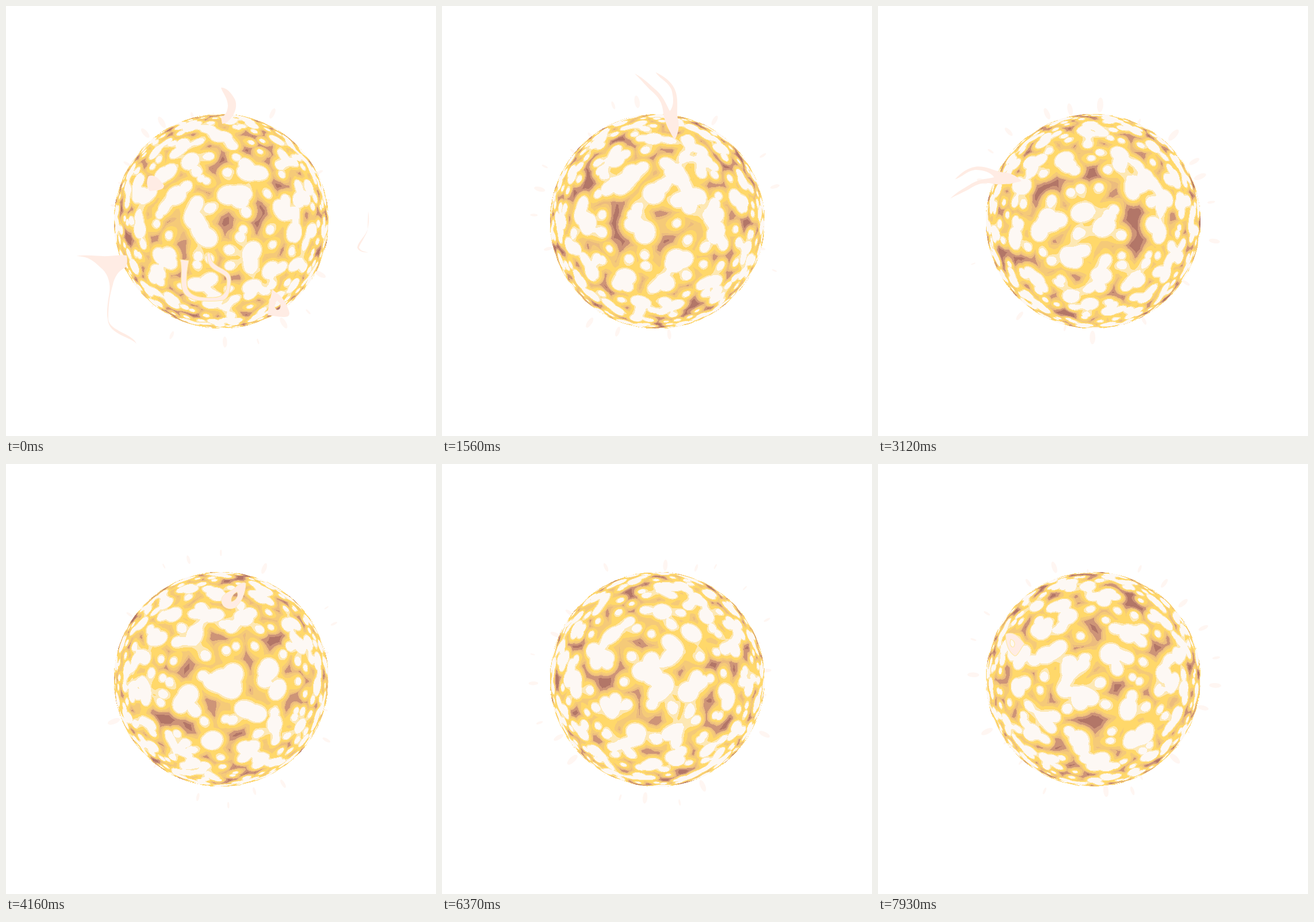
Animation, 748 px wide and 748 px high, one loop 8000 ms. Source, as an HTML page with a canvas:

```html
<!DOCTYPE html>
<html lang="en">
<head>
<meta charset="utf-8">
<title>Star</title>
<style>
  html, body { margin: 0; width: 100%; height: 100%; overflow: hidden; background: #fff; }
  canvas { display: block; width: 100vw; height: 100vh; }
</style>
</head>
<body>
<canvas id="stage" width="748" height="748"></canvas>
<script>
const LOOP = 8000, STEP = 130, SIZE = 748, MID = 374.5, RADIUS = 187;
const TURN_TICKS = 120; // ticks for the fine texture to go round once
const TAU = Math.PI * 2;
const ctx = document.getElementById('stage').getContext('2d');
const fract = v => v - Math.floor(v);
const f32 = Math.fround;
const rand = (a, b = 0) => fract(Math.sin(a * 12.9898 + b * 78.233) * 43758.5453);

// Colour bands from hot to cool, each with its upper limit
const bands = [
  [0.256, 0xfd, 0xf8, 0xf4],
  [0.333, 0xfd, 0xe8, 0xb4],
  [0.513, 0xff, 0xd8, 0x6a],
  [0.667, 0xf5, 0xca, 0x78],
  [0.769, 0xec, 0xbc, 0x7e],
  [1, 0xcd, 0x94, 0x78],
  [9, 0xb2, 0x76, 0x68]
];

// One tileable layer of cell noise with n by n points, hashed in single precision
function cellLayer(n) {
  const px = new Float32Array(n * n), py = new Float32Array(n * n);
  for (let y = 0; y < n; y++) {
    for (let x = 0; x < n; x++) {
      const dot = f32(f32(x * f32(53.3158)) + f32(y * f32(43.6143)));
      const r = f32(523 * f32(Math.sin(dot)));
      px[y * n + x] = fract(f32(f32(15.32354) * r));
      py[y * n + x] = fract(f32(f32(17.25865) * r));
    }
  }
  return (u, v) => {
    u = fract(u) * n;
    v = fract(v) * n;
    const cx = Math.floor(u), cy = Math.floor(v);
    let best = 9;
    for (let j = -1; j <= 1; j++) {
      const row = ((cy + j + n) % n) * n;
      for (let i = -1; i <= 1; i++) {
        const k = row + (cx + i + n) % n;
        const dx = u - cx - i - px[k], dy = v - cy - j - py[k];
        const d = dx * dx + dy * dy;
        if (d < best) best = d;
      }
    }
    return Math.sqrt(best);
  };
}
const coarse = cellLayer(10), fine = cellLayer(20);

// The globe: stereographic texture coordinates for each pixel of the disc
const SIDE = 375, LEFT = MID - SIDE / 2;
const globe = document.createElement('canvas');
globe.width = globe.height = SIDE;
const globeCtx = globe.getContext('2d');
const image = globeCtx.createImageData(SIDE, SIDE);
const disc = [];
for (let y = 0; y < SIDE; y++) {
  for (let x = 0; x < SIDE; x++) {
    const dx = (x + 0.5 - SIDE / 2) / RADIUS, dy = (y + 0.5 - SIDE / 2) / RADIUS;
    const dd = dx * dx + dy * dy;
    if (dd >= 0.9999) continue;
    const k = 0.5 / (1 + Math.sqrt(1 - dd));
    const at = (y * SIDE + x) * 4;
    image.data[at + 3] = 255;
    disc.push({ at, u: dx * k + 0.5, v: dy * k + 0.5 });
  }
}

function drawGlobe(tick) {
  const slow = tick / TURN_TICKS, fast = slow * 2;
  for (const p of disc) {
    const n = 2 * coarse(p.u - fast, p.v) * fine(p.u - slow, p.v);
    const band = bands.find(b => n < b[0]);
    image.data[p.at] = band[1];
    image.data[p.at + 1] = band[2];
    image.data[p.at + 2] = band[3];
  }
  globeCtx.putImageData(image, 0, 0);
  ctx.drawImage(globe, LEFT, LEFT);
}

// Faint petals that leave the rim
function drawPetals(time) {
  const slots = 26;
  ctx.fillStyle = '#fff6f2';
  for (let i = 0; i < slots; i++) {
    const life = time / 2300 + rand(i, 3);
    const round = Math.floor(life), age = life - round;
    const big = rand(i, round + 7);
    if (big < 0.3) continue;
    const grow = Math.sin(age * Math.PI);
    ctx.save();
    ctx.translate(MID, MID);
    ctx.rotate((i + 0.6 * rand(i, round)) / slots * TAU - time * 0.00006);
    ctx.beginPath();
    ctx.ellipse(184 + age * 38, 0, 4 + 9 * grow * big, 1 + 4.5 * grow * big, 0, 0, TAU);
    ctx.fill();
    ctx.restore();
  }
}

const fork = 'M512 332C520 318 530 300 548 288C562 278 566 262 568 250C572 236 576 226 579 214C580 232 574 250 572 262C568 280 556 292 552 300C564 302 576 294 586 284C596 270 592 258 599 245C600 262 598 276 590 288C580 302 562 308 550 316C538 328 526 332 512 332Z';

// time, turn in degrees, root x, root y, outline, warm edge
const flares = [
  [0, 0, 380, 200, 'M374 142C384 142 391 150 398 162C403 172 399 186 392 194C388 200 384 204 376 205L374 194C382 190 385 184 386 174C386 160 377 152 374 142Z'],
  [0, 0, 208, 444, 'M122 435C146 432 160 436 178 435C192 434 202 432 210 434C212 446 210 452 208 455C198 459 192 466 187 480C184 494 178 506 178 545C180 566 222 570 227 588C220 576 178 572 177 545C174 530 178 510 180 498C182 484 178 468 168 458C154 446 148 436 122 435Z'],
  [0, 0, 345, 470, 'M303 441L318 443C314 462 313 480 316 492C322 506 340 508 360 507C376 507 384 500 384 484C386 470 380 468 366 461C354 455 348 446 350 430L355 430C356 444 362 450 374 456C388 463 392 468 391 480C390 494 388 508 378 512C360 514 340 514 326 511C312 506 306 498 305 484C304 468 307 455 303 441Z', '#ffe79c'],
  [0, 0, 472, 520, 'M463 493C472 500 482 506 488 520C492 530 496 536 490 540C480 543 464 538 456 538C454 530 460 512 463 493ZM472 512C467 516 466 524 470 528C475 530 479 526 477 518Z'],
  [0, 0, 260, 308, 'M248 296C258 292 266 300 275 312C274 322 262 320 250 322C244 314 244 304 248 296Z'],
  [0, 0, 618, 410, 'M630 357C633 372 630 385 628 393C622 406 616 414 614 420C616 426 624 428 630 428C622 430 612 426 611 420C612 410 626 400 629 388Z'],
  [910, 0, 400, 590, 'M306 585C304 572 314 566 324 567C336 569 342 584 350 597C360 610 374 612 386 604C400 594 412 582 430 583C450 584 462 580 470 570C478 560 486 555 496 558C502 566 498 590 486 612C496 590 498 568 490 564C480 562 476 574 466 582C452 590 436 586 422 588C404 592 396 604 380 609C364 613 350 610 340 598C332 588 332 578 322 578C312 582 312 596 326 630C316 614 308 604 306 585Z'],
  [910, 0, 362, 222, 'M345 205C358 206 370 212 374 222L374 242C366 232 354 222 345 205Z'],
  [1500, -60, 520, 325, fork],
  [2210, 0, 284, 450, 'M284 442C290 452 297 466 298 480C298 496 292 512 288 528C290 548 288 562 287 578C292 598 300 610 305 625C296 612 290 600 285 584C282 596 278 604 273 613C278 596 277 580 278 566C272 550 264 536 264 520C264 500 260 480 264 468C270 458 278 452 284 442Z'],
  [2210, 0, 520, 325, fork],
  [2210, 0, 240, 356, 'M222 355C232 348 244 350 256 346C252 356 250 362 247 364C238 362 230 362 222 355Z'],
  [3250, -135, 520, 325, fork],
  [4160, 0, 394, 232, 'M417 208C416 224 410 240 398 250C388 254 376 250 375 238C374 226 388 224 398 216C404 210 412 204 417 208ZM402 222C394 226 390 234 392 240C400 238 406 230 402 222Z', '#ffeecb'],
  [5330, 0, 280, 300, 'M262 138C264 156 252 174 244 190C234 206 236 222 240 238C244 260 262 276 288 302C270 306 248 296 234 290C218 288 208 284 204 276C192 250 184 232 169 217C188 230 200 250 214 268C226 280 236 278 238 266C234 246 228 222 234 204C244 184 264 164 260 150Z'],
  [5330, 0, 456, 282, 'M450 282C456 262 464 246 472 234C482 218 500 218 517 221C520 228 508 240 496 252C484 266 470 274 462 290ZM466 262C470 246 480 228 494 226C506 224 512 226 506 234C494 246 478 252 466 262Z'],
  [5330, 0, 355, 495, 'M318 490L332 490C336 504 346 510 354 524C358 540 352 556 340 562C326 570 330 584 350 586C370 588 400 586 420 590C440 596 460 596 464 584C466 576 450 570 430 566C410 562 396 554 390 540C386 524 380 508 375 490L391 490C394 506 402 520 403 536C408 552 420 558 440 564C462 570 472 576 470 586C464 600 446 600 424 596C400 590 370 594 350 592C326 590 316 576 324 566C336 556 344 552 342 536C336 524 316 520 318 490Z'],
  [5880, -105, 520, 325, fork],
  [5880, 120, 520, 325, fork],
  [6900, -58, 520, 325, fork],
  [7930, 0, 238, 312, 'M222 296C234 290 244 298 255 313C248 320 244 334 238 334C228 328 222 314 222 296ZM231 305C228 314 232 320 236 318C240 312 236 306 231 305Z', '#ffe9a8']
].map(([time, turn, x, y, d, edge]) => ({ time, turn, x, y, edge, path: new Path2D(d) }));

// Flares swell, drift outwards and around, then shrink away
function drawFlares(time) {
  const half = 420;
  for (const f of flares) {
    const k = (time - f.time) / half;
    if (Math.abs(k) >= 1) continue;
    const scale = Math.sqrt(1 - k * k);
    ctx.save();
    ctx.translate(MID, MID);
    ctx.rotate((f.turn - 5 * k) * TAU / 360);
    ctx.scale(1 + 0.03 * k, 1 + 0.03 * k);
    ctx.translate(f.x - MID, f.y - MID);
    ctx.scale(scale, scale);
    ctx.translate(-f.x, -f.y);
    ctx.fillStyle = '#ffece4';
    ctx.fill(f.path, 'evenodd');
    if (f.edge) {
      ctx.strokeStyle = f.edge;
      ctx.lineWidth = 1.2;
      ctx.stroke(f.path);
    }
    ctx.restore();
  }
}

let shown = -1;
function frame() {
  const tick = Math.floor((performance.now() % LOOP) / STEP);
  if (tick !== shown) {
    shown = tick;
    const time = tick * STEP;
    ctx.fillStyle = '#fff';
    ctx.fillRect(0, 0, SIZE, SIZE);
    drawPetals(time);
    drawGlobe(tick);
    drawFlares(time);
  }
  requestAnimationFrame(frame);
}
frame();
</script>
</body>
</html>
```
